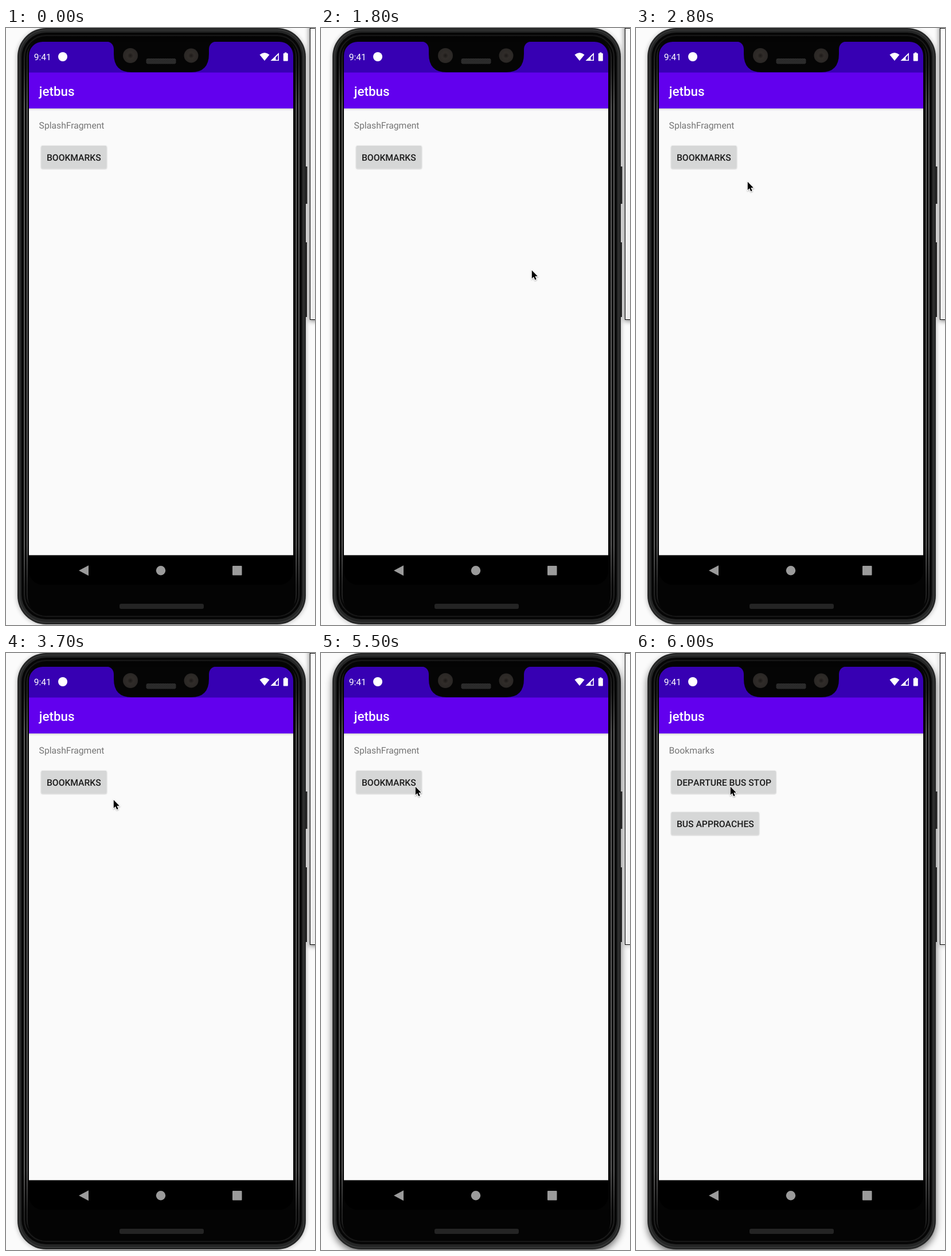
Recreate the animation shown at these times as an HTML page. Size 539 by 1039 pixels, loop 8000 ms.

```html
<!DOCTYPE html>
<html lang="en">
<head>
<meta charset="utf-8">
<title>Phone demo</title>
<style>
html, body { margin: 0; width: 100%; height: 100%; overflow: hidden; background: #fbfbfb; }
svg { display: block; width: 100%; height: 100%; }
text { font-family: Roboto, "Noto Sans", sans-serif; font-size: 15.7px; text-rendering: geometricPrecision; }
.label { fill: #757575; }
.btn { fill: #d6d7d7; filter: url(#lift); }
.caps { font-weight: 500; fill: #1c1c1c; font-kerning: none; }
.band { fill: none; stroke: url(#shine); }
</style>
</head>
<body>
<svg viewBox="0 0 539 1039" preserveAspectRatio="none">
  <defs>
    <filter id="lift" x="-10%" y="-20%" width="120%" height="150%">
      <feDropShadow dx="0" dy=".8" stdDeviation=".8" flood-opacity=".3"/>
    </filter>
    <filter id="soft" x="-30%" y="-10%" width="160%" height="120%"><feGaussianBlur stdDeviation="4.5"/></filter>
    <filter id="wide" x="-20%" y="-10%" width="140%" height="120%"><feGaussianBlur stdDeviation="6.5"/></filter>
    <filter id="blend"><feGaussianBlur stdDeviation=".6"/></filter>
    <filter id="tip" x="-50%" y="-50%" width="200%" height="200%">
      <feDropShadow dx="0" dy="1" stdDeviation=".8" flood-opacity=".4"/>
    </filter>
    <linearGradient id="pane" x2="0" y2="1">
      <stop offset="0" stop-color="#fdfdfd"/><stop offset="1" stop-color="#eeeeee"/>
    </linearGradient>
    <linearGradient id="shine" x2="0" y2="1">
      <stop offset="0" stop-color="#1c1c1c"/><stop offset=".05" stop-color="#2c2c2c"/>
      <stop offset=".12" stop-color="#707070"/><stop offset=".88" stop-color="#707070"/>
      <stop offset=".95" stop-color="#2c2c2c"/><stop offset="1" stop-color="#1c1c1c"/>
    </linearGradient>
    <linearGradient id="drop" x2="0" y2="1">
      <stop offset="0" stop-opacity=".15"/><stop offset="1" stop-opacity="0"/>
    </linearGradient>
    <radialGradient id="lens">
      <stop offset="0" stop-color="#1c1917"/><stop offset=".4" stop-color="#302c29"/>
      <stop offset="1" stop-color="#2a2725"/>
    </radialGradient>
    <pattern id="mesh" width="3" height="3" patternUnits="userSpaceOnUse">
      <path d="M0 0h3v3h-3z" fill="#1b1b1b"/><path d="M0 0h1.5v1.5h-1.5zM1.5 1.5h1.5v1.5h-1.5z" fill="#3a3a3a"/>
    </pattern>
    <clipPath id="screen"><rect x="40" y="24" width="461" height="945" rx="24"/></clipPath>
  </defs>

  <rect width="539" height="1039" fill="#fbfbfb"/>
  <rect id="idle" x="20" y="2" width="503" height="1036" rx="50" opacity=".32" filter="url(#soft)"/>
  <rect id="focus" x="20" y="7" width="503" height="1036" rx="50" opacity=".58" filter="url(#wide)"/>
  <rect id="cast" x="529" y="-30" width="40" height="540" filter="url(#soft)"/>

  <!-- phone body -->
  <path d="M521 241h4.500v65h-4.500zM521 373h4v130h-4z" fill="#222"/>
  <rect x="20" y="0" width="503" height="1038" rx="50" fill="#242525"/>
  <rect x="23.500" y="3.500" width="496" height="1031" rx="46.500" fill="none" stroke="#383939" stroke-width="1.500"/>
  <rect x="27" y="8" width="489" height="1021" rx="43" fill="#060606"/>
  <g filter="url(#blend)">
    <rect class="band" x="32" y="13" width="479" height="1011" rx="38" stroke-width="2" opacity=".8"/>
    <rect class="band" x="36.800" y="18" width="469.400" height="1001" rx="33" stroke-width="1.600"/>
  </g>
  <rect x="38" y="15" width="467" height="1008" rx="33" fill="#040404"/>
  <rect x="198" y="1002" width="147" height="9" rx="3" fill="#242424"/>

  <!-- screen -->
  <g clip-path="url(#screen)">
    <path d="M40 24h461v54H40z" fill="#3700b3"/>
    <path d="M40 77.500h461v63H40z" fill="#6200ee"/>
    <path d="M40 140h461v778H40z" fill="#fafafa"/>
    <path d="M40 140h461v4H40z" fill="url(#drop)"/>
    <path d="M40 917.500h461v52H40z"/>
  </g>
  <path d="M174 23.500Q188 24 188 38V45Q188 77 219 77H323Q354 77 354 45V38Q354 24 368 23.500z" fill="#050505"/>
  <circle cx="217" cy="48" r="13" fill="url(#lens)"/>
  <circle cx="323" cy="48" r="12.500" fill="url(#lens)"/>
  <rect x="244.500" y="53" width="52" height="9.500" rx="3" fill="url(#mesh)"/>

  <text x="48.800" y="56" fill="#fff" style="font-size:15.600px">9:41</text>
  <circle cx="99" cy="50" r="8" fill="#fff"/>
  <g fill="#fff">
    <path d="M451 57L442.500 46.500Q451 39.500 459.500 46.500z"/>
    <path d="M476 43V57H461.500zM474.500 47L470.500 51V55.500H474.500z" fill-rule="evenodd"/>
    <path d="M486 44V42.500h3.500V44h1.500q.8 0 .8.800V56.600q0 .900-.8.900h-6.400q-.8 0-.8-.900V44.800q0-.8.8-.8z"/>
  </g>
  <text x="57.800" y="118" fill="#fff" font-weight="500" style="font-size:22.400px">jetbus</text>

  <g id="splash">
    <text class="label" x="57.600" y="175.200">SplashFragment</text>
    <rect class="btn" x="61.500" y="204.800" width="114" height="39.500" rx="2"/>
    <rect id="press" x="61.500" y="204.800" width="114" height="39.500" rx="2" opacity=".1"/>
    <text class="caps" x="70.900" y="230.800">BOOKMARKS</text>
  </g>
  <g id="marks">
    <text class="label" x="57.600" y="175.200">Bookmarks</text>
    <rect class="btn" x="61.500" y="204.800" width="182.500" height="39.500" rx="2"/>
    <text class="caps" x="70.900" y="230.800">DEPARTURE BUS STOP</text>
    <rect class="btn" x="61.500" y="276.800" width="153" height="39.500" rx="2"/>
    <text class="caps" x="70.900" y="302.600">BUS APPROACHES</text>
  </g>

  <g fill="#9b9b9b">
    <path d="M127 944.300L144 935.300V953.300z"/>
    <circle cx="270" cy="944.300" r="8.200"/>
    <rect x="395" y="936" width="16.500" height="16.500" rx="1"/>
  </g>

  <rect x="530.500" y=".5" width="20" height="507" fill="url(#pane)" stroke="#000"/>

  <g id="cursor" filter="url(#tip)">
    <path d="M0 0V14.200L3.200 11.200L5.500 16.500L7.900 15.500L5.600 10.300H10z" stroke="#fff" stroke-width="1.800" paint-order="stroke"/>
  </g>
</svg>
<script>
const LOOP = 8000, STEP = 100;
const el = id => document.getElementById(id);
const show = (id, on) => { el(id).style.display = on ? "" : "none"; };
const smooth = u => u * u * (3 - 2 * u);
const settle = u => 1 - (1 - u) ** 2;

// Pointer moves: start, end, from, to, easing; it rests in between.
const moves = [
  [900, 1100, [522, 485], [498, 491], settle],
  [1400, 2200, [495, 494], [238, 347], smooth],
  [2300, 3000, [242, 335], [190, 261], settle],
  [3700, 4200, [187, 255], [164, 235], settle],
  [4600, 4600, [164, 232], [164, 232], settle]
];

function pointer(t) {
  const [start, end, from, to, ease] = moves.filter(m => t >= m[0]).pop();
  const u = t >= end ? 1 : ease((t - start) / (end - start));
  return from.map((v, i) => Math.round(v + (to[i] - v) * u) + 0.8);
}

function draw(ms) {
  const t = Math.floor((ms % LOOP) / STEP) * STEP;
  const focused = t >= 5500;
  show("idle", !focused);
  show("focus", focused);
  el("cast").setAttribute("opacity", focused ? 0.2 : 0.5);
  show("press", t === 5800);
  show("splash", t < 5900);
  show("marks", t >= 5900);
  show("cursor", t >= 900);
  if (t >= 900) el("cursor").setAttribute("transform", `translate(${pointer(t)})`);
}

const begin = performance.now();
function tick() {
  draw(performance.now() - begin);
  requestAnimationFrame(tick);
}
tick();
</script>
</body>
</html>
```
